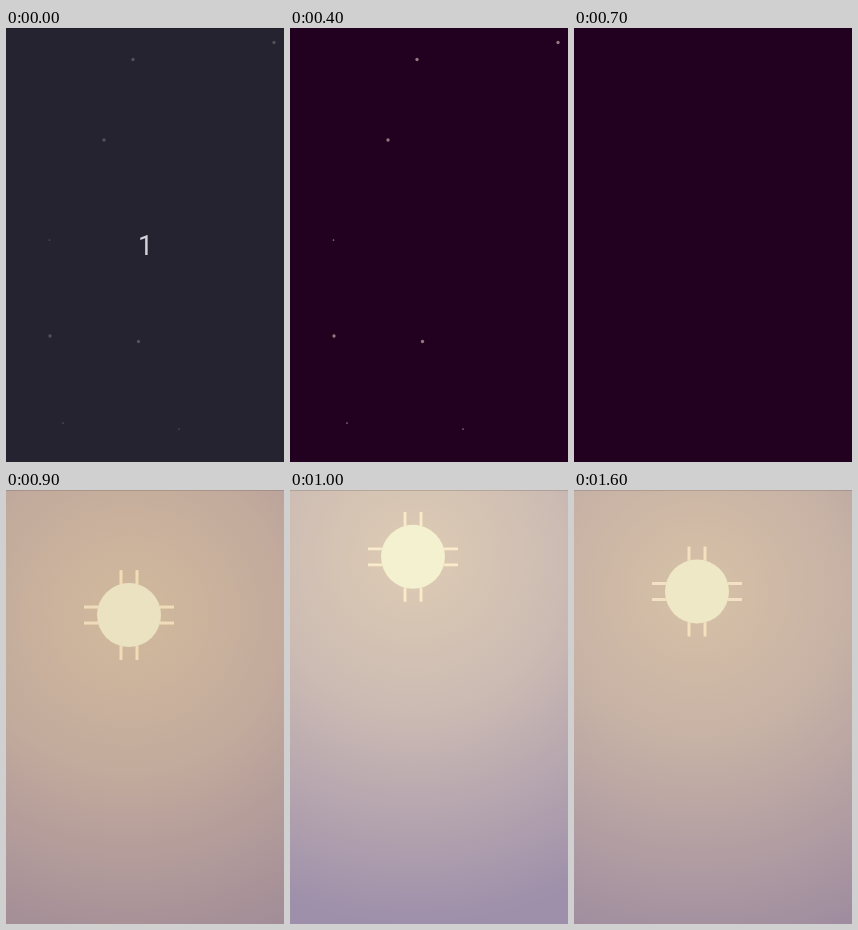
Recreate the animation shown at these times as an HTML page with a canvas. Size 278 by 434 pixels, loop 1.7 s.

```html
<!DOCTYPE html>
<html>
<head>
<meta charset="utf-8">
<style>
  html, body { margin: 0; overflow: hidden; background: #22001f; }
  canvas { display: block; }
</style>
</head>
<body>
<canvas id="stage" width="278" height="434"></canvas>
<script>
const W = 278, H = 434, STEP = 100, LOOP = 1700;
const SUNRISE = 700, SETTLED = 1200;
const LOW = 272, HIGH = 66, REST = 101.5;
const ctx = document.getElementById('stage').getContext('2d');

const bigStars = [[127, 31.5], [268, 14.5], [98, 112], [44, 308], [132.5, 313.5]];
const smallStars = [[43.5, 212], [57, 395], [173, 401]];

// Colours for the lowest and the highest sun; sky runs outward from it
const low = { sky: ['#b48e64', '#ab8264', '#9e7864'], rays: '#d5b586', disc: '#d2be96' };
const high = { sky: ['#deccb4', '#ccbbb3', '#9e8fab'], rays: '#f8ecd0', disc: '#f4f1d1' };

function fill(style) {
  ctx.fillStyle = style;
  ctx.fillRect(0, 0, W, H);
}

function circle(x, y, r, color) {
  ctx.fillStyle = color;
  ctx.beginPath();
  ctx.arc(x, y, r, 0, 2 * Math.PI);
  ctx.fill();
}

function drawStars(alpha) {
  ctx.globalAlpha = alpha;
  for (const [x, y] of bigStars) circle(x, y, 1.65, '#fff4e8');
  for (const [x, y] of smallStars) circle(x, y, 0.85, '#fff4e8');
  ctx.globalAlpha = 1;
}

function drawTopEdge() {
  ctx.fillStyle = 'rgba(0, 0, 0, .14)';
  ctx.fillRect(0, 0, W, 1);
}

function drawTitle() {
  fill('#25232f');
  drawStars(0.22);
  ctx.fillStyle = '#d5d3da';
  ctx.font = '27px Roboto, sans-serif';
  ctx.textAlign = 'center';
  ctx.fillText('1', 139.5, 227);
  drawTopEdge();
}

function drawNight(t) {
  fill('#22001f');
  drawStars((SUNRISE - t) / (SUNRISE - STEP));
}

// Fast rise that overshoots before coming to rest
function sunHeight(t) {
  const left = Math.max(0, (SETTLED - t) / (SETTLED - SUNRISE));
  return REST + 938 * left ** 1.5 * (left - 0.546);
}

function drawDay(t) {
  const x = 123, y = sunHeight(t);

  const paint = {
    sky(colors) {
      const glow = ctx.createRadialGradient(x, y, 0, x, y, 367);
      [0, 0.42, 1].forEach((stop, i) => glow.addColorStop(stop, colors[i]));
      fill(glow);
      drawTopEdge();
    },
    rays(color) {
      ctx.fillStyle = color;
      for (const d of [-8, 8]) {
        ctx.fillRect(x + d - 1.5, y - 45, 3, 90);
        ctx.fillRect(x - 45, y + d - 1.5, 90, 3);
      }
    },
    disc(color) {
      circle(x, y, 32, color);
    }
  };

  for (const part in paint) {
    paint[part](low[part]);
    ctx.globalAlpha = (LOW - y) / (LOW - HIGH);
    paint[part](high[part]);
    ctx.globalAlpha = 1;
  }
}

function draw() {
  const t = Math.floor(performance.now() % LOOP / STEP) * STEP;
  if (t < STEP) drawTitle();
  else if (t <= SUNRISE) drawNight(t);
  else drawDay(t);
  requestAnimationFrame(draw);
}
draw();
</script>
</body>
</html>
```
